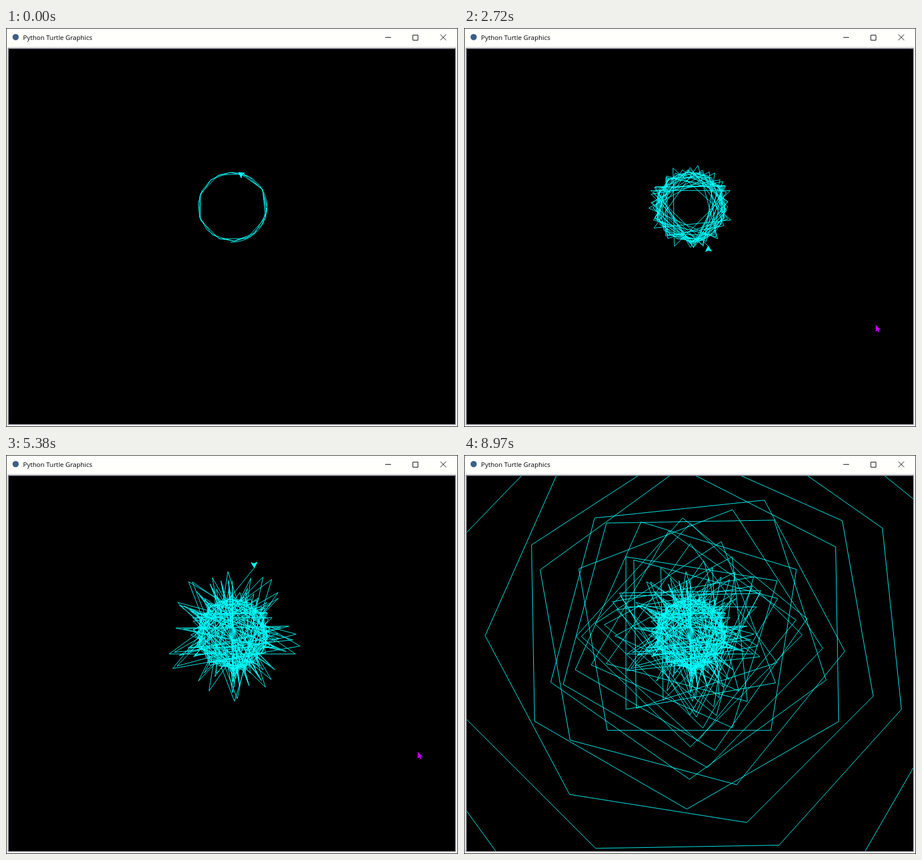
An HTML page with a canvas that plays this animation: 796x703 px, repeating every 9010 ms.

```html
<!DOCTYPE html>
<html lang="en">
<head>
<meta charset="utf-8">
<title>Python Turtle Graphics</title>
<style>
  html, body { margin: 0; width: 100%; height: 100%; overflow: hidden; background: #f2f2f0; }
  canvas { display: block; }
</style>
</head>
<body>
<canvas id="stage" width="796" height="703"></canvas>
<script>
const ctx = document.getElementById('stage').getContext('2d');
const LOOP = 9010, TICK = 33.24, TICK_START = 94;
const SCALE = 1.029, ORIGIN = [395.2, 377.4];

// [tick, turtle commands done]; forward and left count as one each
const PACE = [[-1, 100], [31, 173], [79, 275], [109, 337], [159, 445], [197, 524], [280, 704]];
// [ms, x, y] of the mouse pointer
const POINTER = [[500, 415, 374], [1160, 415, 374], [1930, 674, 496], [2300, 725, 523], [8850, 725, 523]];
const ARROW = [[0, 0], [-9, 5], [-7, 0], [-9, -5]];
const CURSOR = [[0, 0], [0, 12], [3, 9.5], [4.5, 13], [6.5, 12.2], [5, 8.8], [8.8, 8.8]];

// Heading before step n: the sum of all earlier turns
const heading = n => (n * (n - 1) / 2 % 360) * Math.PI / 180;

// forward(n); left(n) for n = 1, 2, 3, ...
const path = [ORIGIN];
for (let n = 1; n <= 360; n++) {
  const [x, y] = path[n - 1], a = heading(n);
  path.push([x + SCALE * n * Math.cos(a), y - SCALE * n * Math.sin(a)]);
}

function along(keys, t) {
  let i = 1;
  while (i < keys.length - 1 && t > keys[i][0]) i++;
  const a = keys[i - 1], b = keys[i];
  const p = Math.min(1, Math.max(0, (t - a[0]) / (b[0] - a[0])));
  return a.slice(1).map((v, j) => v + (b[j + 1] - v) * p);
}

function trace(points) {
  ctx.beginPath();
  points.forEach(([x, y]) => ctx.lineTo(x, y));
}

function box(color, x, y, w, h) {
  ctx.fillStyle = color;
  ctx.fillRect(x, y, w, h);
}

function drawWindow() {
  box('#2b2b2b', 0, 0, 796, 703);
  box('#f2f2f0', 1, 1, 794, 701);
  box('#fffffc', 1, 1, 794, 31);
  box('#8a8a98', 3, 35, 789, 664);
  box('#000', 5, 37, 786, 661);

  ctx.fillStyle = '#3d5f85';
  ctx.beginPath();
  ctx.arc(17, 16, 5.5, 0, 7);
  ctx.fill();

  ctx.fillStyle = '#000';
  ctx.font = '11.5px "Open Sans", "Noto Sans", sans-serif';
  ctx.fillText('Python Turtle Graphics', 30, 21);

  ctx.strokeStyle = '#000';
  ctx.lineWidth = 1;
  ctx.beginPath();
  ctx.moveTo(668, 16.5); ctx.lineTo(678, 16.5);
  ctx.rect(716.5, 12.5, 9, 9);
  ctx.moveTo(765, 11.5); ctx.lineTo(775, 21.5);
  ctx.moveTo(775, 11.5); ctx.lineTo(765, 21.5);
  ctx.stroke();
}

function drawTurtle(done) {
  const steps = Math.floor(done / 2), [x, y] = path[steps];
  ctx.save();
  ctx.beginPath();
  ctx.rect(5, 37, 786, 661);
  ctx.clip();
  ctx.strokeStyle = ctx.fillStyle = '#0ff';
  ctx.lineJoin = 'bevel';
  trace(path.slice(0, steps + 1));
  ctx.stroke();

  ctx.translate(x, y);
  ctx.rotate(-heading(Math.ceil(done / 2)));
  ctx.scale(SCALE, SCALE);
  trace(ARROW);
  ctx.closePath();
  ctx.fill();
  ctx.stroke();
  ctx.restore();
}

function drawPointer(t) {
  if (t < POINTER[0][0] || t > POINTER.at(-1)[0]) return;
  const [x, y] = along(POINTER, t);
  ctx.fillStyle = '#c000f0';
  trace(CURSOR.map(([dx, dy]) => [x + dx, y + dy]));
  ctx.fill();
}

function frame(now) {
  const t = now % LOOP;
  const tick = Math.max(-1, Math.floor((t - TICK_START) / TICK));
  drawWindow();
  drawTurtle(Math.round(along(PACE, tick)[0]));
  drawPointer(t);
  requestAnimationFrame(frame);
}
requestAnimationFrame(frame);
</script>
</body>
</html>
```
